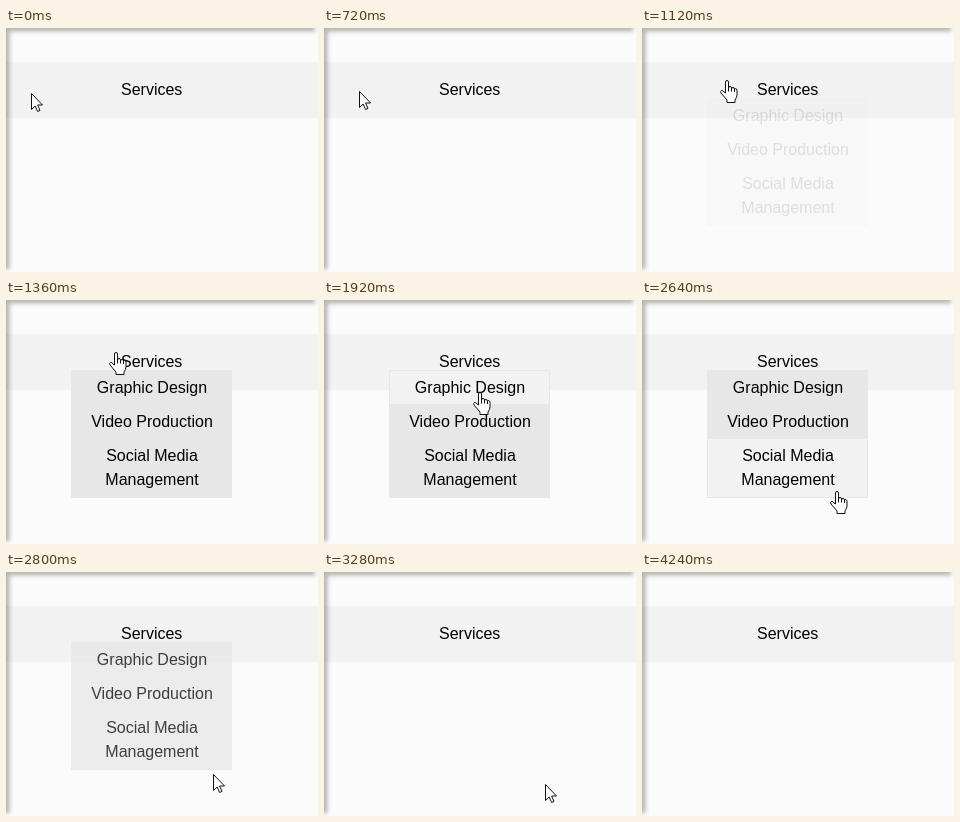
These frames come from a looping animation (312x244 px, 5120 ms). An HTML page:

```html
<!DOCTYPE html>
<html lang="en">
<head>
<meta charset="utf-8">
<title>Dropdown menu</title>
<style>
html, body { margin: 0; width: 100%; height: 100%; overflow: hidden; background: #fbfbfb; }
svg { display: block; }
text { font: 16px "Liberation Sans", Arial, sans-serif; }
#menu text { text-anchor: middle; }
#menu rect { fill: #e7e7e7; stroke: #e7e7e7; }
#menu .hover rect { fill: #f2f2f2; }
#shade { fill: rgba(0, 0, 0, .28); filter: blur(2px); }
#cursor { fill: #fff; stroke: #111; stroke-linejoin: round; }
</style>
</head>
<body>
<svg width="312" height="244">
  <rect y="34" width="312" height="56" fill="#f2f2f2"/>
  <text x="115" y="67">Services</text>
  <g id="menu"></g>
  <path id="shade" d="M-10-10H309V3.5H3.5V241H-10Z"/>
  <g id="cursor">
    <path id="arrow" d="M.5.5V16.5L4.2 13 6.6 18.5 9 17.4 6.6 12H11.5Z"/>
    <path id="hand" transform="translate(-6)" d="M5.5 13V2Q5.5.5 7 .5T8.5 2V8Q8.5 6.5 10 6.5T11.5 8V9Q11.5 7.5 13 7.5T14.5 9V10Q14.5 8.5 15.5 8.5T17 10V15Q17 17 15 20V22.5H7V20L1 13Q0 11 1.5 10.5T4 12ZM8.5 8V11.5M11.5 9V11.5M14.5 10V12"/>
  </g>
</svg>
<script>
const LOOP = 5120, STEP = 80;
const LINE = 24, PAD = 10;
const labels = [["Graphic Design"], ["Video Production"], ["Social Media", "Management"]];
// Pointer stops: time, x, y
const stops = [
  [640, 25, 65], [1120, 84, 52], [1360, 109, 52], [1920, 155, 92],
  [2640, 194, 191], [2960, 220, 212], [3520, 221, 212], [3680, 295, 184]
];
const [menu, cursor, arrow, hand] =
  ["menu", "cursor", "arrow", "hand"].map(id => document.getElementById(id));
const clamp = v => Math.max(0, Math.min(1, v));
const show = (el, on) => el.style.display = on ? "" : "none";

function add(parent, tag, attrs = {}, text = "") {
  const el = document.createElementNS("http://www.w3.org/2000/svg", tag);
  for (const name in attrs) el.setAttribute(name, attrs[name]);
  el.textContent = text;
  return parent.appendChild(el);
}

let bottom = 70;
const items = labels.map(lines => {
  const top = bottom, height = PAD + LINE * lines.length;
  const el = add(menu, "g");
  add(el, "rect", { x: 65.5, y: top + .5, width: 160, height: height + 1 });
  lines.forEach((line, i) => add(el, "text", { x: 146, y: top + 23 + i * LINE }, line));
  bottom += height;
  return { el, top, bottom };
});

function pointerAt(t) {
  const next = stops.findIndex(stop => stop[0] > t);
  const i = next < 0 ? stops.length - 1 : Math.max(1, next);
  const [t0, x0, y0] = stops[i - 1], [t1, x1, y1] = stops[i];
  const k = clamp((t - t0) / (t1 - t0));
  return [x0 + (x1 - x0) * k, y0 + (y1 - y0) * k].map(Math.round);
}

function draw(now) {
  const t = Math.floor(now % LOOP / STEP) * STEP;
  const [x, y] = pointerAt(t);
  const overMenu = t >= 1040 && t < 2720;

  cursor.setAttribute("transform", `translate(${x} ${y})`);
  show(cursor, t < 3760);
  show(hand, overMenu);
  show(arrow, !overMenu);

  const fadeIn = clamp((t - 1040) / 320) ** 1.6;
  const fadeOut = clamp((3040 - t) / 320);
  menu.style.opacity = Math.min(fadeIn, fadeOut);
  for (const { el, top, bottom } of items)
    el.classList.toggle("hover", overMenu && y >= top && y < bottom);
}

const start = performance.now();
function tick() {
  draw(performance.now() - start);
  requestAnimationFrame(tick);
}
tick();
</script>
</body>
</html>
```
